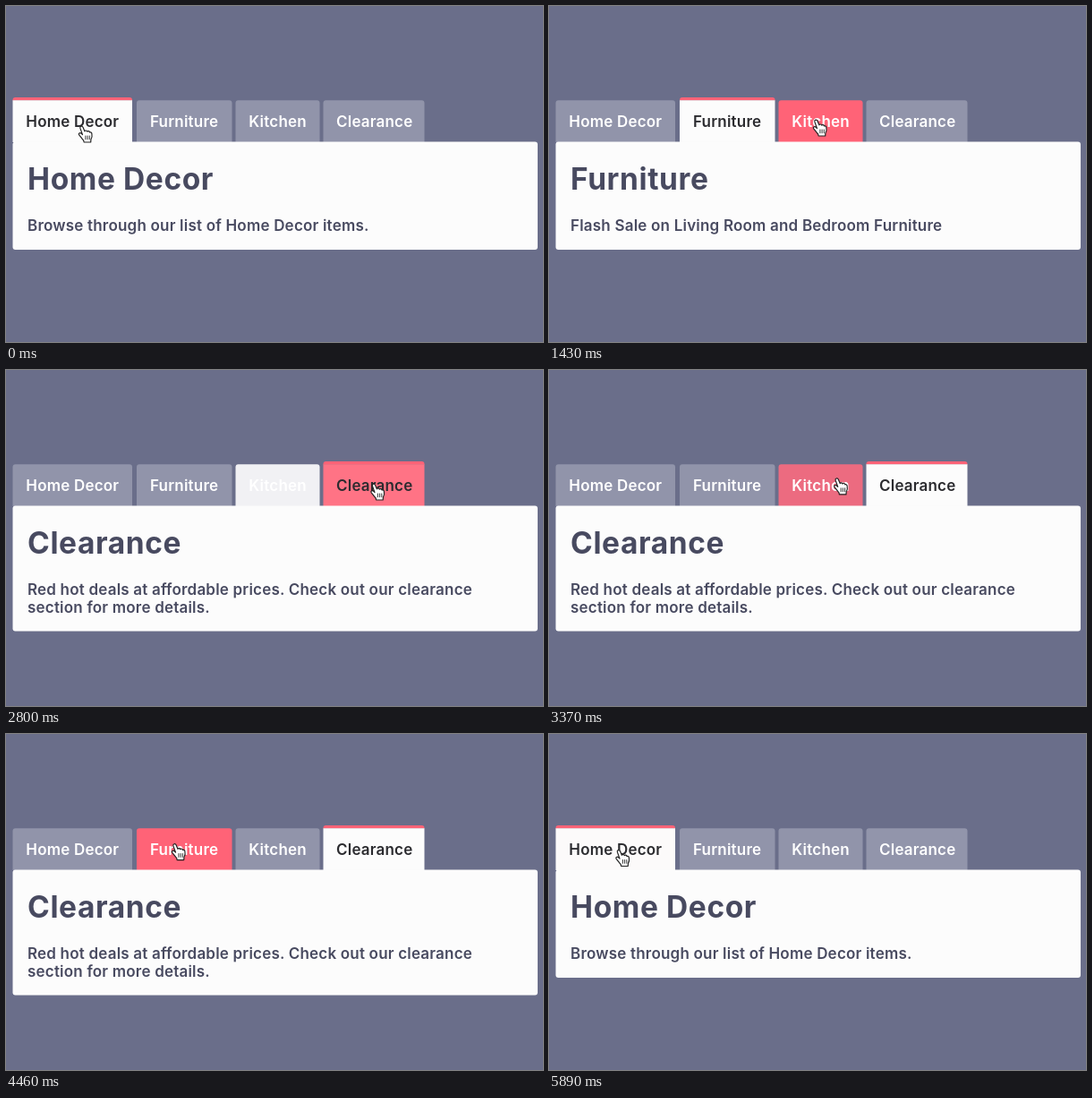
Animation, 600 px wide and 375 px high, one loop 6120 ms. Source, as an HTML page:

```html
<!DOCTYPE html>
<html lang="en">
<head>
<meta charset="utf-8">
<title>Shop tabs</title>
<style>
  html, body { margin: 0; width: 100%; height: 100%; overflow: hidden; background: #6a6e8a; }
  svg { display: block; width: 600px; height: 375px; }
  text { font: 600 17px Inter, sans-serif; letter-spacing: .2px; fill: #484a60; }
  .title { font-weight: 700; font-size: 33.5px; letter-spacing: .6px; }
</style>
</head>
<body>
<svg viewBox="0 0 600 375">
  <g id="tabs"></g>
  <rect id="panel" x="7.5" y="151.5" width="586.5" rx="3" fill="#fcfcfc"/>
  <text id="title" class="title" x="24" y="205"></text>
  <text id="line1" x="24" y="251"></text>
  <text id="line2" x="24" y="270.5"></text>
  <g id="hand" stroke="#222" stroke-width="1.2" stroke-linejoin="round" stroke-linecap="round">
    <path fill="#fff" d="M-3 .6L-5.6-6.6C-6.3-9-3.4-9.8-2.4-7.6L-.6-3.2C0-4.4 1.8-4.2 2.2-2.8C3-3.8 4.6-3.4 5-2C6-2.6 7.2-1.8 7.4-.4C7.9 2 7.6 4 6.4 6L6.2 9H-1.4L-1.8 7C-3.6 5.2-4.6 3.2-6.8.8C-8-.8-5.8-2-4.4-.8Z"/>
    <path fill="none" stroke-width=".9" d="M.4 2V5.8M2.6 2V5.8M4.8 2V5.8"/>
  </g>
</svg>
<script>
const LOOP = 6120, TICK = 57.2, FADE = 200;
const IDLE = 0, HOVER = 1, ACTIVE = 2;
const COLORS = [[145, 148, 170], [255, 99, 119], [252, 252, 252]];

// The picture only moves inside these spans, and holds between them.
const SPANS = [[120, 460], [690, 1430], [1720, 1890], [2120, 2460], [2800, 2970],
  [3200, 3490], [3720, 4120], [4460, 4970], [5770, 5890]];

// Each tab: edges, label start, and its [time, state] changes.
const TABS = [
  { name: 'Home Decor', left: 7.5, right: 141, textX: 22.3,
    lines: ['Browse through our list of Home Decor items.'],
    states: [[-FADE, ACTIVE], [682, IDLE], [4690, HOVER], [5710, ACTIVE]] },
  { name: 'Furniture', left: 146, right: 252.5, textX: 161,
    lines: ['Flash Sale on Living Room and Bedroom Furniture'],
    states: [[-FADE, IDLE], [250, HOVER], [682, ACTIVE], [1710, IDLE], [3890, HOVER], [4640, IDLE]] },
  { name: 'Kitchen', left: 256.5, right: 350.5, textX: 271.3,
    lines: ['Bring the best out of the master chef in you!'],
    states: [[-FADE, IDLE], [1040, HOVER], [1710, ACTIVE], [2790, IDLE], [3258, HOVER], [3870, IDLE]] },
  { name: 'Clearance', left: 354.5, right: 467.5, textX: 369,
    lines: ['Red hot deals at affordable prices. Check out our clearance', 'section for more details.'],
    states: [[-FADE, IDLE], [2235, HOVER], [2790, ACTIVE], [5710, IDLE]] },
];

// Cursor moves: start, end, target x, target y.
const START = [88.5, 143];
const MOVES = [[90, 460, 186.5, 137], [860, 1230, 295, 135], [1280, 1430, 302.5, 136],
  [2060, 2460, 415, 136], [3110, 3490, 299, 128], [3680, 4120, 193, 131.5], [4440, 4970, 82, 138.5]];

const $ = id => document.getElementById(id);
const clamp = u => Math.max(0, Math.min(1, u));
const mix = (a, b, u) => a + (b - a) * u;
const easeOut = u => 1 - (1 - u) ** 2.1;
const smooth = u => u * u * (3 - 2 * u);

function add(tag, attrs) {
  const el = document.createElementNS('http://www.w3.org/2000/svg', tag);
  for (const key in attrs) el.setAttribute(key, attrs[key]);
  return $('tabs').appendChild(el);
}

const tabShape = (tab, top, bottom, r) =>
  `M${tab.left} ${bottom}V${top + r}q0-${r} ${r}-${r}H${tab.right - r}q${r} 0 ${r} ${r}V${bottom}z`;

for (const tab of TABS) {
  tab.cap = add('path', { d: tabShape(tab, 102, 105.5, 3), fill: '#ff6377' });
  tab.body = add('path', {});
  tab.label = add('text', { x: tab.textX, y: 135 });
  tab.label.textContent = tab.name;
}

function heldTime(t) {
  let held = 0;
  for (const [from, to] of SPANS) {
    if (t >= from) held = Math.min(to, from + Math.floor((t - from + 8) / TICK) * TICK);
  }
  return held;
}

function drawTab(tab, t) {
  const now = tab.states.findLastIndex(([start]) => t >= start);
  const [start, state] = tab.states[now];
  const before = COLORS[tab.states[Math.max(0, now - 1)][1]];
  const u = easeOut(clamp((t - start) / FADE));
  const active = state === ACTIVE;
  tab.cap.style.display = active ? '' : 'none';
  tab.body.setAttribute('d', tabShape(tab, 105.3, 152, active ? 0 : 3));
  tab.body.style.fill = `rgb(${before.map((c, i) => Math.round(mix(c, COLORS[state][i], u)))})`;
  tab.label.style.fill = active ? '#2b2b2f' : '#fff';
  if (active) drawPanel(tab);
}

function drawPanel({ name, lines }) {
  $('title').textContent = name;
  $('line1').textContent = lines[0];
  $('line2').textContent = lines[1] || '';
  $('panel').setAttribute('height', lines[1] ? 140 : 120.5);
}

function drawHand(t) {
  let [x, y] = START;
  for (const [from, to, toX, toY] of MOVES) {
    const u = smooth(clamp((t - from) / (to - from)));
    x = mix(x, toX, u);
    y = mix(y, toY, u);
  }
  $('hand').setAttribute('transform', `translate(${x} ${y})`);
}

function draw() {
  const t = heldTime(performance.now() % LOOP);
  for (const tab of TABS) drawTab(tab, t);
  drawHand(t);
  requestAnimationFrame(draw);
}
draw();
</script>
</body>
</html>
```
